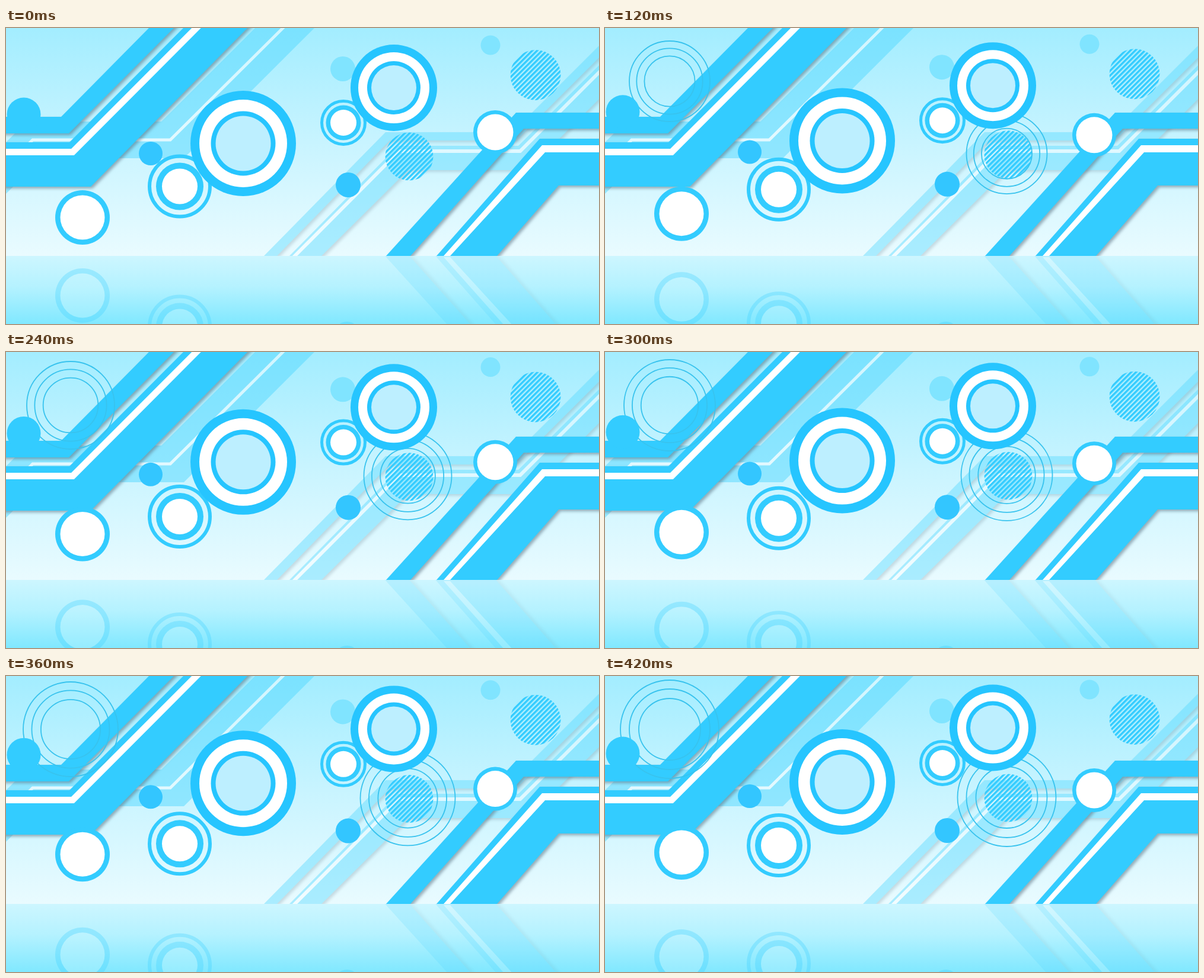
These frames come from a looping animation (1000 px wide and 500 px high, 0.45 s). An HTML page:

```html
<!DOCTYPE html>
<html lang="en">
<head>
<meta charset="utf-8">
<title>Drifting circles</title>
<style>
html, body { margin: 0; width: 100%; height: 100%; overflow: hidden; }
svg { display: block; width: 1000px; height: 500px; }
.band { fill: #33ccff; }
.shade { filter: drop-shadow(3px 3px 2.5px rgba(85, 110, 125, .55)); }
.faint .band { fill: #54d9ff; }
.line { fill: none; stroke: #fff; }
.rings { fill: none; stroke: #38c3ee; stroke-width: 1.8; }
#ringSet circle { vector-effect: non-scaling-stroke; }
</style>
</head>
<body>
<svg viewBox="0 0 1000 500">
  <defs>
    <linearGradient id="wall" x2="0" y2="1">
      <stop stop-color="#a3edff"/><stop offset=".5" stop-color="#c8f4ff"/><stop offset="1" stop-color="#e9fbff"/>
    </linearGradient>
    <linearGradient id="floor" x2="0" y2="1">
      <stop stop-color="#cdf6ff"/><stop offset=".45" stop-color="#b5f2ff"/><stop offset="1" stop-color="#80e8ff"/>
    </linearGradient>
    <pattern id="hatch" width="5.8" height="5.8" patternUnits="userSpaceOnUse" patternTransform="rotate(-45)">
      <rect width="5.8" height="3.4" fill="#33ccff"/>
    </pattern>
    <clipPath id="above"><rect width="1000" height="385"/></clipPath>
    <clipPath id="below"><rect y="385" width="1000" height="115"/></clipPath>
    <g id="ringSet"><circle r="83"/><circle r="68"/><circle r="52"/></g>
  </defs>

  <rect width="1000" height="385" fill="url(#wall)"/>
  <rect y="385" width="1000" height="115" fill="url(#floor)"/>

  <g clip-path="url(#above)">
    <g class="faint" opacity=".5">
      <path class="band" d="M35 158H262L420 0H520L300 220H60L0 280V193Z"/>
      <path class="line" stroke-width="5" d="M470-3L277 189H45L0 234"/>
    </g>
    <g class="faint shade" opacity=".42">
      <path class="band" d="M435 385L640 176H854L1000 30V50L860 190H647L457 385Z"/>
      <path class="band" d="M478 385L661 199H864L1000 63V120L880 240H678L532 385Z"/>
      <path class="line" stroke-width="6" d="M484 388L663 208H867L1003 72"/>
    </g>
    <path class="band shade" d="M-9 150H93L241 0V-9H292L106 178H-9Z"/>
    <path class="band shade" d="M-9 193H107L308-9H416L143 268H-9Z"/>
    <path class="line" stroke-width="11" d="M-9 209.500H112.500L330-9"/>
    <g id="right">
      <path class="band shade" d="M641 385L860 143H1009V170H873L682 385L673 395H632Z"/>
      <path class="band shade" d="M726 385L900 187H1009V266H932L828 385L819 395H717Z"/>
      <path fill="#fff" d="M738 385L904 198H1009V210H909L749 385Z"/>
    </g>
  </g>

  <g class="rings" id="leftRings"><use href="#ringSet"/></g>
  <g data-x="680" data-y="217" data-dy="-11"><circle r="40.500" fill="url(#hatch)"/></g>
  <g class="rings" id="rightRings"><use href="#ringSet"/></g>
  <g data-x="893" data-y="79.500" data-dy="-6"><circle r="42.500" fill="url(#hatch)"/></g>
  <g id="discs"></g>

  <g clip-path="url(#below)">
    <g transform="matrix(1 0 0 -1 0 772)">
      <g opacity=".14"><use href="#right"/></g>
      <g opacity=".28" id="mirror"></g>
    </g>
    <circle cx="575" cy="517" r="21" fill="#33ccff" opacity=".3"/>
  </g>
</svg>
<script>
const BLUE = '#33ccff', DEEP = '#26c5ff', DOT = '#33c6ff', PALE = '#80e4ff', WHITE = '#fff', INNER = '#bdefff';
const $ = id => document.getElementById(id);

// x, start y, travel over the loop, then [radius, colour, stroke width] per circle
const discs = [
  [30, 146, -15, [28.5, BLUE]],
  [568, 69, -10, [21, PALE]],
  [817, 29, -6, [16.5, PALE]],
  [244, 212, -9, [20, DOT]],
  [577, 265, -4, [21, DOT]],
  [129, 320, -22, [46, BLUE], [37.5, WHITE]],
  [293, 267.5, 18.5, [51, BLUE, 6], [40, BLUE], [30, WHITE]],
  [569, 160, -13, [36.5, BLUE, 5], [29.5, BLUE], [22, WHITE]],
  [400, 195, -16, [89, DEEP], [74, WHITE], [54.5, DEEP], [46.5, INNER]],
  [654, 101, -13.5, [73, DEEP], [60, WHITE], [45, DEEP], [38, INNER]],
  [825, 176, 17, [37, BLUE], [30.5, WHITE]]
];

const circle = ([r, color, width]) => width
  ? `<circle r="${r}" fill="none" stroke="${color}" stroke-width="${width}"/>`
  : `<circle r="${r}" fill="${color}"/>`;
const group = ([x, y, dy, ...parts]) =>
  `<g data-x="${x}" data-y="${y}" data-dy="${dy}">${parts.map(circle).join('')}</g>`;

$('discs').innerHTML = discs.map(group).join('');

// The floor shows only the two lowest discs, with a dim centre
$('mirror').innerHTML = discs.slice(5, 7).map(group).join('')
  .replaceAll(`fill="${WHITE}"`, 'fill="#cdf7ff"');

const movers = [...document.querySelectorAll('[data-dy]')];

function placeRings(id, x, y, k) {
  $(id).setAttribute('transform', `translate(${x} ${y}) scale(${(62 + 21 * k) / 83})`);
  $(id).style.display = k ? '' : 'none';
}

function draw() {
  const k = Math.floor(performance.now() % 450 / 30) / 14;
  for (const m of movers) {
    const { x, y, dy } = m.dataset;
    m.setAttribute('transform', `translate(${x} ${+y + dy * k})`);
  }
  placeRings('leftRings', 109, 90, k);
  placeRings('rightRings', 677.5, 215 - 10 * k, k);
  requestAnimationFrame(draw);
}
draw();
</script>
</body>
</html>
```
